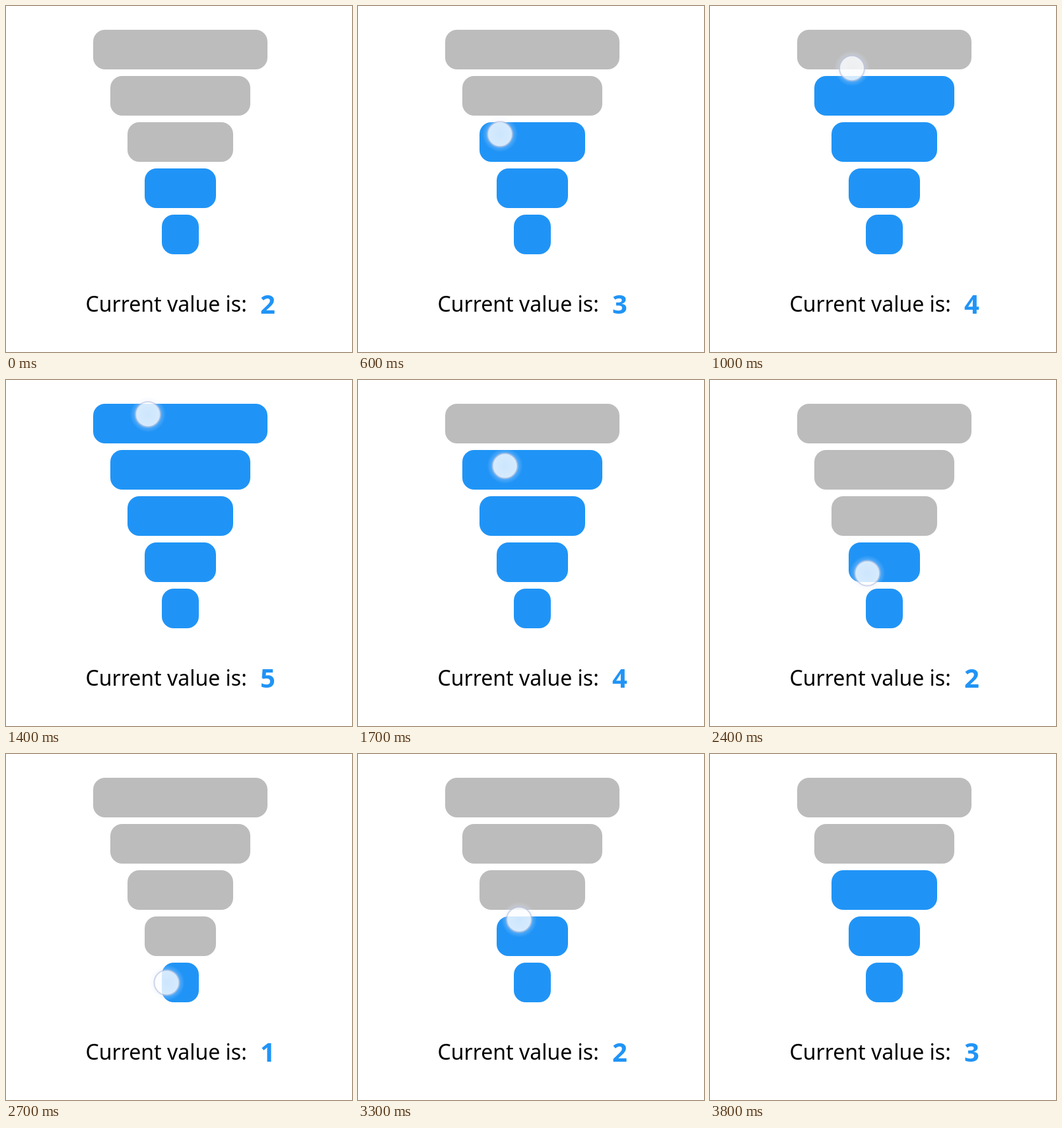
Recreate the animation shown at these times as an HTML page. Size 524 by 524 pixels, loop 4.1 s.

```html
<!DOCTYPE html>
<html lang="en">
<head>
<meta charset="utf-8">
<title>Funnel slider</title>
<style>
  html, body { margin: 0; width: 100%; height: 100%; overflow: hidden; background: #fff; }
  svg { display: block; width: 524px; height: 524px; }
  text { font-family: "Noto Sans", "Open Sans", sans-serif; }
  .label { font-size: 32px; fill: #000; }
  .value { font-size: 40px; font-weight: 700; fill: #2094f6; }
</style>
</head>
<body>
<svg viewBox="0 0 524 524">
  <defs>
    <radialGradient id="glow">
      <stop offset="0.65" stop-color="#dce8ff" stop-opacity="0.35"/>
      <stop offset="1" stop-color="#dce8ff" stop-opacity="0"/>
    </radialGradient>
    <radialGradient id="disc">
      <stop offset="0" stop-color="#fff" stop-opacity="0.68"/>
      <stop offset="1" stop-color="#fff" stop-opacity="0.74"/>
    </radialGradient>
  </defs>
  <g id="bars"></g>
  <text class="label" x="120.5" y="463">Current value is:</text>
  <text class="value" id="value" x="385" y="466">2</text>
  <g id="touch" visibility="hidden">
    <circle r="27" fill="url(#glow)"/>
    <circle r="18.5" fill="url(#disc)"/>
    <circle r="19" fill="none" stroke="#bac2dc" stroke-opacity="0.6" stroke-width="2.2"/>
  </g>
</svg>
<script>
  const LOOP = 4100, STEP = 100, COUNT = 5;
  const BLUE = "#2094f6", GREY = "#bcbcbc";

  // The drag's start, top, bottom and end; pow shapes the ease-out into each point
  const stops = [
    { t: 400, x: 215, y: 262 },
    { t: 1400, x: 215, y: 52, pow: 1.75 },
    { t: 2750, x: 244, y: 352, pow: 1.2 },
    { t: 3700, x: 244, y: 177, pow: 1 }
  ];
  const start = stops[0], end = stops[stops.length - 1];

  const byId = id => document.getElementById(id);
  const valueText = byId("value"), touch = byId("touch");

  function makeBar(_, i) {
    const bar = document.createElementNS("http://www.w3.org/2000/svg", "rect");
    const size = { x: 132 + 26 * i, y: 36 + 70 * i, width: 264 - 52 * i, height: 60, rx: 18 };
    for (const key in size) bar.setAttribute(key, size[key]);
    byId("bars").append(bar);
    return bar;
  }
  const bars = Array.from({ length: COUNT }, makeBar);

  function pointAt(time) {
    const t = Math.max(start.t, Math.min(end.t, time));
    const i = stops.findIndex((stop, n) => n > 0 && t <= stop.t);
    const a = stops[i - 1], b = stops[i];
    const k = 1 - (1 - (t - a.t) / (b.t - a.t)) ** b.pow;
    return [a.x + (b.x - a.x) * k, a.y + (b.y - a.y) * k];
  }

  function draw(now) {
    const t = Math.floor((now % LOOP) / STEP) * STEP;
    const [x, y] = pointAt(t);
    const row = Math.floor((y - 22) / 70);
    bars.forEach((bar, i) => bar.setAttribute("fill", i >= row ? BLUE : GREY));
    valueText.textContent = COUNT - row;
    touch.setAttribute("transform", `translate(${x} ${y})`);
    touch.setAttribute("visibility", t >= start.t && t <= end.t ? "visible" : "hidden");
  }

  function tick() {
    draw(performance.now());
    requestAnimationFrame(tick);
  }
  tick();
</script>
</body>
</html>
```
